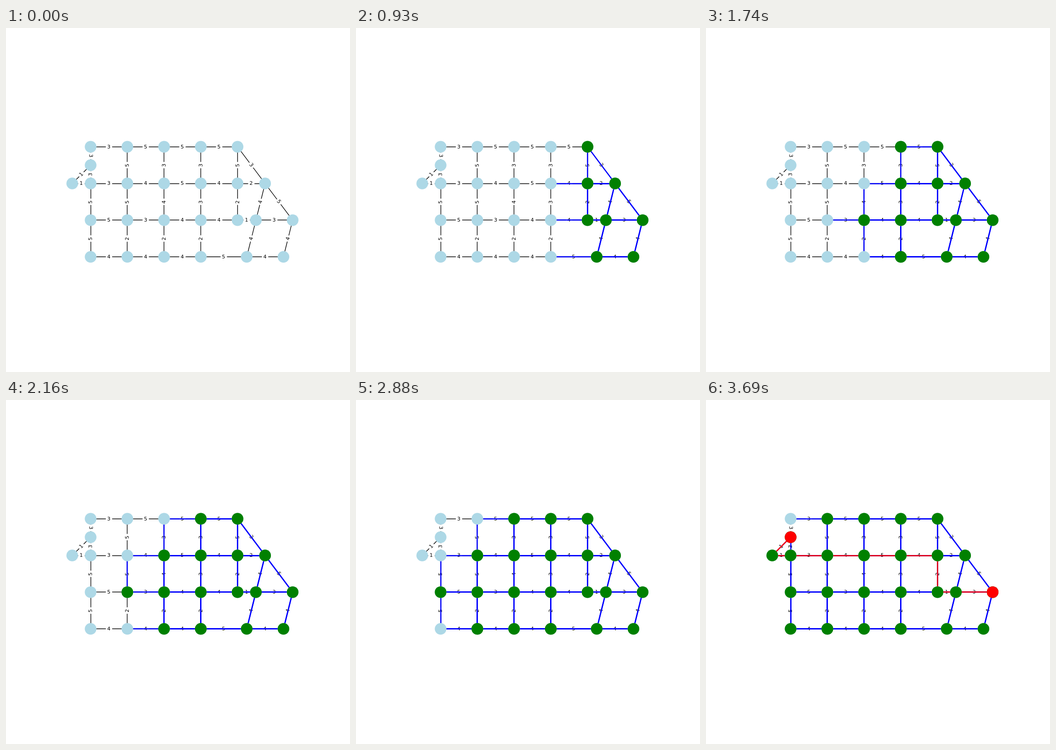
Animation of 748x748 px, one loop 3720 ms. Source, as an HTML page with a canvas:

```html
<!DOCTYPE html>
<html lang="en">
<head>
<meta charset="utf-8">
<title>Shortest path search</title>
<style>
  html, body { margin: 0; width: 100%; height: 100%; overflow: hidden; background: #fff; }
  canvas { display: block; }
</style>
</head>
<body>
<canvas id="stage" width="748" height="748"></canvas>
<script>
const ctx = document.getElementById('stage').getContext('2d');
const STEP = 30, LOOP = 3720;

// Grid coordinates: column, row
const nodes = { S: [0, 0.5], C0: [-0.5, 1], C6: [4.75, 1], D6: [4.5, 2], D7: [5.5, 2], E5: [4.25, 3], E6: [5.25, 3] };
[['A', 5], ['C', 5], ['D', 5], ['E', 4]].forEach(([row, count], y) => {
  for (let x = 0; x < count; x++) nodes[row + (x + 1)] = [x, y];
});
for (const id in nodes) {
  const [x, y] = nodes[id];
  nodes[id] = { x: 184 + 79.87 * x, y: 258.3 + 79.77 * y };
}

// Each entry: two nodes and the weight between them
const edges = `A1 A2 3,A1 S 3,A2 A3 5,A2 C2 5,A3 A4 5,A3 C3 3,A4 A5 5,A4 C4 3,A5 C5 5,S C0 1,S C1 3,
C0 C1 1,C1 C2 3,C1 D1 5,C2 C3 4,C2 D2 5,C3 C4 5,C3 D3 4,C4 C5 4,C4 D4 3,C5 C6 2,C5 D5 2,C6 D6 4,C6 D7 5,
D1 D2 5,D1 E1 5,D2 D3 3,D2 E2 2,D3 D4 4,D3 E3 2,D4 D5 4,D4 E4 2,D5 D6 1,D6 D7 3,D6 E5 4,D7 E6 4,
E1 E2 4,E2 E3 4,E3 E4 4,E4 E5 5,E5 E6 4,A5 C6 3`.split(',').map(s => {
  const [a, b, weight] = s.trim().split(' ');
  return { a, b, weight };
});

// Order in which the queue is emptied; outdated entries are expanded again
const visits = 'D7 D6 D5 E6 C6 C5 E5 A5 D4 E4 C4 E4 D3 A4 E3 C3 D2 E2 A3 E2 C2 D1 E1 C1 A2 C0'.split(' ');
const route = 'S C0 C1 C2 C3 C4 C5 D5 D6 D7'.split(' ');

const events = [];
const paintNode = (node, color) => events.push({ node, color });
const paintEdge = (edge, color) => events.push({ edge, color });
for (const id of visits) {
  paintNode(id, 'green');
  edges.filter(e => e.a === id || e.b === id).forEach(e => paintEdge(e, 'blue'));
}
paintNode('S', 'green');
paintNode('S', 'red');
route.slice(1).forEach((b, i) => paintEdge({ a: route[i], b }, 'red'));
paintNode('D7', 'red');

const snap = v => Math.floor(v) + 0.5;

function drawEdge({ a, b }, color, width) {
  let { x: x1, y: y1 } = nodes[a], { x: x2, y: y2 } = nodes[b];
  if (x1 === x2) x1 = x2 = snap(x1);
  if (y1 === y2) y1 = y2 = snap(y1);
  ctx.strokeStyle = color;
  ctx.lineWidth = width;
  ctx.beginPath();
  ctx.moveTo(x1, y1);
  ctx.lineTo(x2, y2);
  ctx.stroke();
}

function drawLabel({ a, b, weight }) {
  const p = nodes[a], q = nodes[b];
  let angle = Math.atan2(q.y - p.y, q.x - p.x);
  if (angle >= Math.PI / 2 && a + b !== 'A1S') angle -= Math.PI;
  if (angle < -Math.PI / 2) angle += Math.PI;
  ctx.save();
  ctx.translate((p.x + q.x) / 2, (p.y + q.y) / 2);
  ctx.rotate(angle);
  ctx.fillStyle = '#fff';
  ctx.beginPath();
  ctx.roundRect(-6.9, -8.9, 13.8, 17.8, 3.3);
  ctx.fill();
  ctx.fillStyle = '#000';
  ctx.fillText(weight, -0.4, 3.2);
  ctx.restore();
}

function drawNode(id, color) {
  ctx.fillStyle = color;
  ctx.beginPath();
  ctx.arc(nodes[id].x, nodes[id].y, 12.7, 0, 2 * Math.PI);
  ctx.fill();
}

function draw(step) {
  const done = events.slice(0, step);
  ctx.fillStyle = '#fff';
  ctx.fillRect(0, 0, 748, 748);
  ctx.font = '11.1px "DejaVu Sans", sans-serif';
  ctx.textAlign = 'center';
  edges.forEach(e => drawEdge(e, '#000', 1.39));
  edges.forEach(drawLabel);
  done.forEach(e => e.edge && drawEdge(e.edge, e.color, 2.5));
  Object.keys(nodes).forEach(id => drawNode(id, 'lightblue'));
  done.forEach(e => e.node && drawNode(e.node, e.color));
}

function tick() {
  draw(Math.floor(performance.now() % LOOP / STEP));
  requestAnimationFrame(tick);
}
tick();
</script>
</body>
</html>
```
